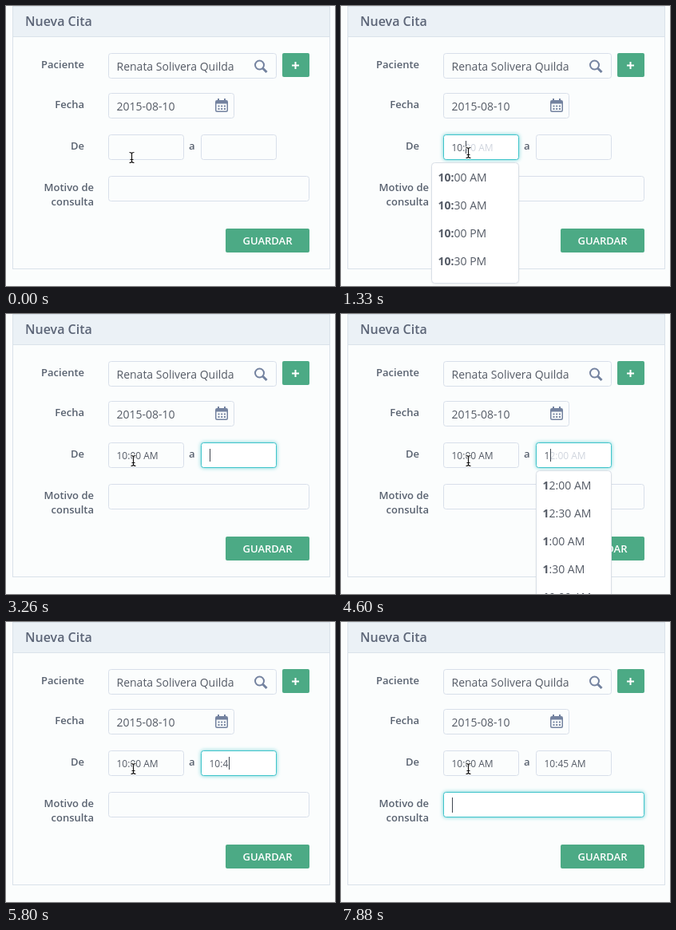
An HTML page that plays this animation: 412x351 px, repeating every 8000 ms.

```html
<!DOCTYPE html>
<html lang="es">
<head>
<meta charset="utf-8">
<title>Nueva Cita</title>
<style>
html, body { margin: 0; height: 100%; overflow: hidden; background: #fbfdfd; }
svg { display: block; width: 412px; height: 351px; font-family: "Open Sans", sans-serif; }
text { fill: #555b66; white-space: pre; font-size: 14px; }
.label { font-size: 13px; font-weight: 600; fill: #596270; }
.end { text-anchor: end; }
.time { font-size: 12px; }
.hint { fill: #d0d5de; }
.bold { font-weight: 700; }
.box { fill: #fbfdfd; stroke: #d8dfea; }
.icon { fill: none; stroke: #73829f; stroke-width: 2; }
.list { fill: #fff; stroke: #d9dfe6; filter: drop-shadow(0 1px 1px rgba(0,0,0,.06)); }
</style>
</head>
<body>
<svg viewBox="0 0 412 351">
  <rect x="8.5" y="-.5" width="397" height="330" fill="#fbfdfd" stroke="#dae2ea"/>
  <path d="M9 0H405V38H9Z" fill="#ebf1f6"/>
  <path d="M8 38.5H406M8 .5H406" stroke="#dae2ea"/>
  <text x="24" y="25" style="font-size:16px;font-weight:600;fill:#5c6577">Nueva Cita</text>
  <text class="label end" x="98" y="78">Paciente</text>
  <text class="label end" x="98" y="128">Fecha</text>
  <text class="label end" x="98" y="180">De</text>
  <text class="label" x="229" y="180">a</text>
  <text class="label end" x="110" y="232">Motivo de</text>
  <text class="label end" x="110" y="250">consulta</text>

  <rect class="box" x="128.5" y="59.5" width="210" height="31" rx="3"/>
  <text x="138.5" y="81">Renata Solivera Quilda</text>
  <circle class="icon" cx="317.5" cy="74" r="5.5"/>
  <path class="icon" d="M321.5 78L326.500 83" style="stroke-width:3"/>
  <rect x="346" y="59" width="34" height="30" rx="2" fill="#4caa85"/>
  <path d="M358 74.500H367M362.500 70V79" stroke="#fff" stroke-width="2"/>

  <rect class="box" x="128.500" y="109.500" width="157" height="31" rx="3"/>
  <text x="138.500" y="130.500">2015-08-10</text>
  <g fill="#73829f">
    <rect class="icon" x="262.750" y="118.750" width="14.500" height="13.500" rx="1.500" style="stroke-width:1.500"/>
    <path d="M263 119H277V122.500H263ZM265 116H267V120H265ZM273 116H275V120H273Z"/>
    <path d="M265.500 125.500H275M265.500 129H275" stroke="#73829f" stroke-width="2" stroke-dasharray="2 1.700"/>
  </g>

  <g id="fields"></g>
  <rect x="275" y="279" width="105" height="30" rx="2" fill="#4caa85"/>
  <text x="327.500" y="299" text-anchor="middle" style="font-size:13px;font-weight:600;fill:#fff">GUARDAR</text>
  <g id="menu"></g>
  <g id="mouse" fill="none">
    <path id="beam" d="M-3 -6.500Q0 -6.500 0 -4.500Q0 -6.500 3 -6.500M0 -5V5M-3 6.500Q0 6.500 0 4.500Q0 6.500 3 6.500M-2 2.500H2" stroke="#fff" stroke-width="2.600"/>
    <use href="#beam" style="stroke:#111"/>
    <path d="M-3 -6.500Q0 -6.500 0 -4.500Q0 -6.500 3 -6.500M0 -5V5M-3 6.500Q0 6.500 0 4.500Q0 6.500 3 6.500M-2 2.500H2" stroke="#111" stroke-width="1.200"/>
  </g>
</svg>
<script>
const LOOP = 8000;
const $ = id => document.getElementById(id);

const fields = [
  { x: 128, y: 161, w: 95, menuX: 113, menuW: 110 },
  { x: 244, y: 161, w: 95, menuX: 244, menuW: 95 },
  { x: 128, y: 213, w: 252 }
];

// time, focused field, typed text, glow strength, caret visible
const steps = [
  [0, -1, "", 0, 0],
  [290, 0, "", .5, 1],
  [440, 0, "", 1, 1],
  [740, 0, "1", 1, 1],
  [890, 0, "10", 1, 1],
  [1330, 0, "10:", 1, 1],
  [1630, 0, "10:0", 1, 1],
  [1770, 0, "10:00", 1, 1],
  [2220, 0, "10:00 ", 1, 1],
  [2520, 0, "10:00 A", 1, 1],
  [2670, 0, "10:00 AM", 1, 1],
  [3110, 1, "", .5, 1],
  [3260, 1, "", 1, 1],
  [3860, 1, "", 1, 0],
  [4300, 1, "", 1, 1],
  [4600, 1, "1", 1, 1],
  [4750, 1, "10", 1, 1],
  [5050, 1, "10:", 1, 1],
  [5650, 1, "10:4", 1, 1],
  [5950, 1, "10:45", 1, 1],
  [6400, 1, "10:45", 1, 0],
  [7000, 1, "10:45 ", 1, 1],
  [7290, 1, "10:45 A", 1, 1],
  [7440, 1, "10:45 AM", 1, 1],
  [7730, 2, "", .5, 1],
  [7880, 2, "", 1, 1]
];
const finished = ["10:00 AM", "10:45 AM", ""];

// every half hour of the day
const hours = Array.from({ length: 48 }, (_, i) =>
  `${(i >> 1) % 12 || 12}:${i % 2 ? "30" : "00"} ${i < 24 ? "AM" : "PM"}`);
const matches = typed => typed ? hours.filter(h => h.startsWith(typed)).slice(0, 5) : [];

function fieldMarkup(f, typed, hint, glow) {
  const rect = (cls, style) =>
    `<rect class="${cls}" x="${f.x + .5}" y="${f.y + .5}" width="${f.w - 1}" height="31" rx="3" style="${style}"/>`;
  const lit = glow ? rect("", `fill:#fff;stroke:#3fc4ca;opacity:${glow};filter:drop-shadow(0 0 2.5px rgba(63,196,202,.75))`) : "";
  return rect("box", "") + lit +
    `<text class="time" x="${f.x + 10.5}" y="${f.y + 21}"><tspan>${typed}</tspan><tspan class="hint">${hint}</tspan></text>`;
}

function menuMarkup(f, typed, items) {
  if (!items.length) return "";
  const rows = items.map((item, i) =>
    `<text x="${f.menuX + 8.5}" y="${220 + 35 * i}"><tspan class="bold">${typed}</tspan>${item.slice(typed.length)}</text>`);
  return `<rect class="list" x="${f.menuX + .5}" y="196.5" width="${f.menuW - 1}" height="${11 + 35 * items.length}" rx="4"/>` + rows.join("");
}

function show([, focus, typed, glow, caret]) {
  const items = matches(typed);
  const hint = items.length ? items[0].slice(typed.length) : "";
  $("fields").innerHTML = fields.map((f, i) => {
    if (i === focus) return fieldMarkup(f, typed, hint, glow);
    return fieldMarkup(f, i < focus ? finished[i] : "", "", i === focus - 1 ? 1 - glow : 0);
  }).join("");
  $("menu").innerHTML = focus < 0 ? "" : menuMarkup(fields[focus], typed, items);
  if (!caret) return;
  const f = fields[focus];
  const width = $("fields").querySelectorAll("text")[focus].firstChild.getComputedTextLength();
  const [dy, h] = focus === 2 ? [7, 19] : [8, 16];
  $("fields").innerHTML +=
    `<rect x="${Math.round(f.x + 11 + width)}" y="${f.y + dy}" width="1" height="${h}" fill="#3f4650"/>`;
}

let current;
function tick(now) {
  const t = now % LOOP;
  const step = steps.findLast(s => s[0] <= t);
  if (step !== current) show(current = step);
  $("mouse").setAttribute("transform", t < 150 ? "translate(157.5 190)" : "translate(159.5 184)");
  requestAnimationFrame(tick);
}
tick(0);
</script>
</body>
</html>
```
